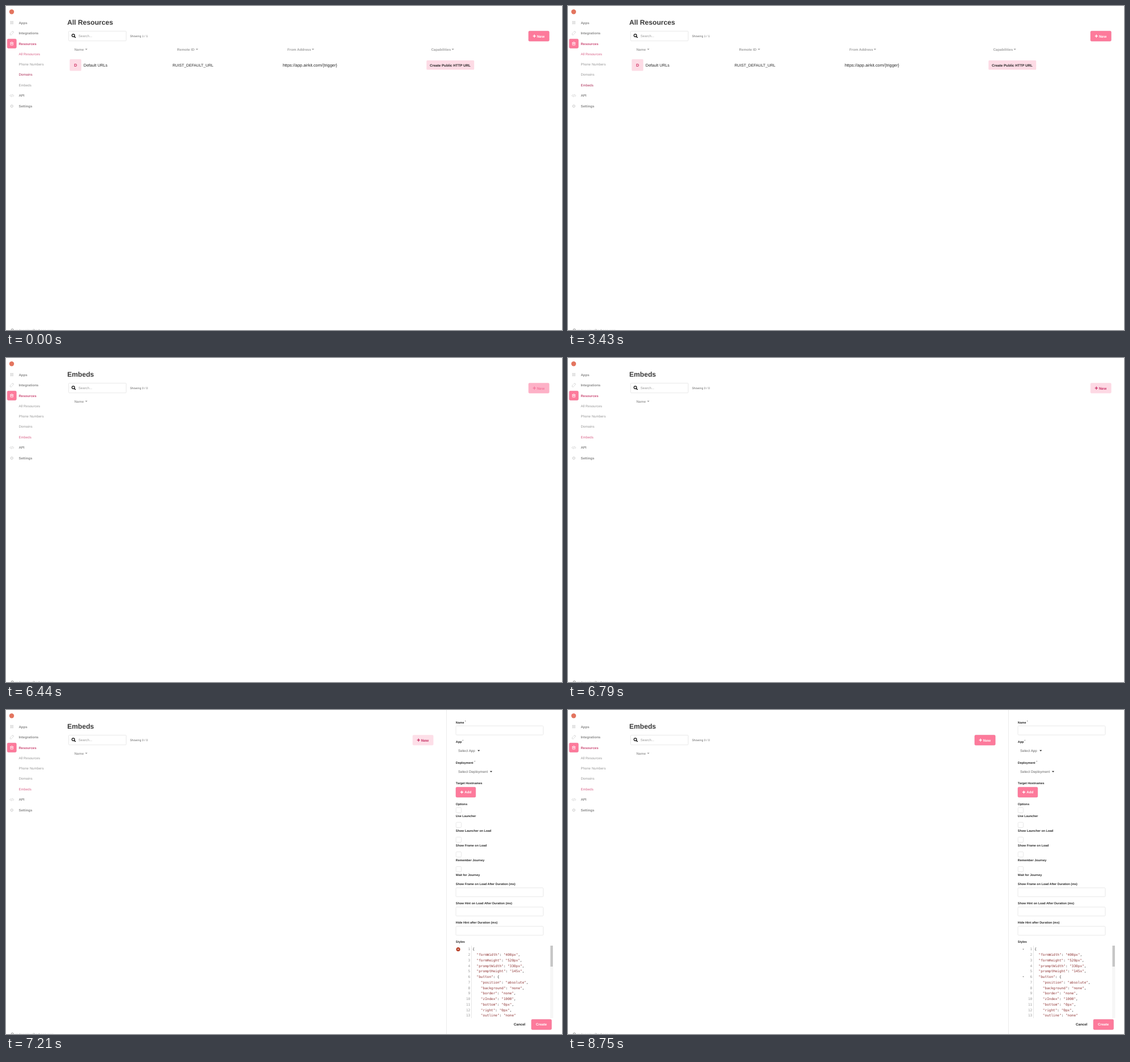
Recreate the animation shown at these times as an HTML page. Size 980 by 572 pixels, loop 9170 ms.

```html
<!DOCTYPE html>
<html lang="en">
<head>
<meta charset="utf-8">
<title>Resources</title>
<style>
  html, body { margin: 0; width: 100%; height: 100%; overflow: hidden; background: #fff; }
  svg { display: block; width: 980px; height: 572px; }
  text { font-family: "Liberation Sans", Arial, sans-serif; text-rendering: geometricPrecision; white-space: pre; }
  .b { font-weight: bold; }
  .code { font-family: "DejaVu Sans Mono", monospace; }
  .line { fill: none; stroke: #c9c9c9; stroke-width: .8; }
</style>
</head>
<body>
<svg id="stage" viewBox="0 0 980 572"></svg>
<script>
const LOOP = 9170;
const PINK = '#fd7a9b', EDGE = '#ec7093', ROSE = '#cc4f79', SOFT = '#d9668b', DARK = '#ad3059', GRAY = '#8b8b8b', INK = '#262626';

// y is the middle of the capital letters
const text = (x, y, size, fill, str, attrs = '') =>
  `<text x="${x}" y="${y + size * .36}" font-size="${size}" fill="${fill}" ${attrs}>${str}</text>`;
const bold = (x, y, size, fill, str, attrs = '') => text(x, y, size, fill, str, 'class="b" ' + attrs);
const rect = (x, y, w, h, fill, r = 0, attrs = '') =>
  `<rect x="${x}" y="${y}" width="${w}" height="${h}" rx="${r}" fill="${fill}" ${attrs}/>`;
const field = (x, y, w, h) => rect(x, y, w, h, '#fff', 1.5, 'stroke="#e2e2e2" stroke-width=".8"');
const caret = (x, y, fill, s = 2.1) => `<path d="M${x - s} ${y - s / 2}h${2 * s}l${-s} ${s * 1.1}z" fill="${fill}"/>`;
const plus = (x, y, color) => `<path d="M${x - 2.6} ${y}h5.2M${x} ${y - 2.6}v5.2" stroke="${color}" stroke-width="1.3"/>`;
const button = (x, y, w, h, fill = PINK, edge = EDGE) =>
  rect(x, y, w, h, fill, 1.8, `stroke="${edge}" stroke-width=".6"`);

function sidebar() {
  const groups = [['Apps', 29.7], ['Integrations', 48], ['Resources', 66.5], ['API', 158.3], ['Settings', 176.8]];
  const pages = ['All Resources', 'Phone Numbers', 'Domains', 'Embeds'];
  return '<circle cx="10" cy="10.3" r="4.2" fill="#e3755f"/>' +
    groups.map(([s, y]) => bold(22.4, y, 6.1, s == 'Resources' ? ROSE : GRAY, s)).join('') +
    pages.map((s, i) => text(22.4, 84.6 + i * 18.35, 6.1, '#999', s, 'data-page')).join('') +
    button(2.2, 58.3, 16, 16.1) +
    `<g class="line">
      <path d="M7.5 27.3h5.6M7.5 29.3h5.6M7.5 31.3h5.6" stroke-width="1.2" stroke-dasharray="1.5 .5"/>
      <path d="M9.7 46.2l1.2-1.1q1.2-.8 2 .1t0 2l-1.8 1.7M10.8 49.6l-1.3 1.2q-1.2.8-2-.1t0-2l1.8-1.7"/>
      <path d="M7.2 65.2l3-1.8 3 1.8zM7.8 66.7h4.8M8 66.7v2.4h4.4v-2.4" stroke="#fff"/>
      <path d="M8.8 156.2l-2 2 2 2M11.8 156.2l2 2-2 2M10.9 155.8l-1.2 4.8"/>
      <circle cx="10.2" cy="176.8" r="1.7"/>
      <circle cx="10.2" cy="176.8" r="2.6" stroke-dasharray="1 1.04"/>
    </g>
    <circle cx="11.2" cy="572.2" r="2.2" class="line" style="stroke:#777"/>` +
    text(16, 572.4, 6.1, GRAY, 'mvlearning@orbano.com');
}

function listing() {
  const head = (x, s, cx) => bold(x, 76.5, 6.2, '#a0a0a0', s) + caret(cx, 76.6, '#999');
  return bold(108, 28.7, 12.1, '#383838', '', 'id="title"') +
    field(110.4, 44.4, 101.5, 17.2) +
    '<path d="M120.3 53.7l2.3 2.3" stroke="#111" stroke-width="1.6"/>' +
    '<circle cx="118.6" cy="52" r="2.4" fill="none" stroke="#111" stroke-width="1.2"/>' +
    text(127.8, 52.6, 6.05, '#999', 'Search...') +
    text(218.4, 53.2, 5.2, '#666', '', 'id="count"') +
    head(120.4, 'Name', 141.5) +
    '<g id="row">' +
    head(301.6, 'Remote ID', 336.6) + head(496, 'From Address', 541) + head(749.4, 'Capabilities', 787.6) +
    rect(112.3, 94, 20.4, 20.4, '#fddbe5', 1.5) +
    bold(122.5, 104.3, 7.2, '#cf2f63', 'D', 'text-anchor="middle"') +
    text(136.8, 104.3, 7.07, INK, 'Default URLs') +
    text(293.4, 104.3, 6.85, INK, 'RUIST_DEFAULT_URL') +
    text(487.7, 104.3, 7.4, INK, 'https://app.airkit.com/{trigger}') +
    rect(741.2, 96, 84, 16.4, '#fddbe5', 1.5) +
    bold(747, 104.3, 6.2, INK, 'Create Public HTTP URL') + '</g>';
}

function editor() {
  const rows = ['{', '  "formWidth": "400px",', '  "formHeight": "520px",', '  "promptWidth": "330px",',
    '  "promptHeight": "145x",', '  "button": {', '    "position": "absolute",', '    "background": "none",',
    '    "border": "none",', '    "zIndex": "1000",', '    "bottom": "0px",', '    "right": "0px",', '    "outline": "none"'];
  const paint = s => s.replace(/"[^"]*"/g, '<tspan fill="#8f3535">$&</tspan>');
  return rows.map((s, i) => {
    const y = 422.3 + i * 9.73;
    return text(818.2, y, 6.05, '#999', i + 1, 'class="code" text-anchor="end"') +
      text(822.3, y, 6.05, INK, paint(s), 'class="code" xml:space="preserve"');
  }).join('') +
    rect(820, 416, .7, 128, '#ddd') + rect(959.3, 416, 5, 128, '#f6f6f6') + rect(959.6, 416, 4.3, 37, '#c6c6c6') +
    `<g id="error"><circle cx="797" cy="422.5" r="3.5" fill="#b5381f"/>
      <path d="M795.7 421.2l2.6 2.6m0-2.6l-2.6 2.6" stroke="#fff" stroke-width=".8"/></g>
    <g id="folds">${caret(802.5, 422.4, '#777', 1.4)}${caret(802.5, 471, '#777', 1.4)}</g>`;
}

function panel() {
  const label = (y, s) => bold(792.8, y, 5.4, INK, s);
  const star = (x, y) => text(x, y, 5, '#444', '*');
  const checks = ['Use Launcher', 'Show Launcher on Load', 'Show Frame on Load', 'Remember Journey', 'Wait for Journey'];
  const times = ['Show Frame on Load After Duration (ms)', 'Show Hint on Load After Duration (ms)', 'Hide Hint after Duration (ms)'];
  return '<g id="panel">' + rect(776, 0, 204, 572, '#fff') + rect(776, 0, .8, 572, '#e6e6e6') +
    label(21.6, 'Name') + star(808.8, 20.6) + field(793, 28, 154, 16) +
    label(55.6, 'App') + star(804.2, 54.6) + text(797, 71.5, 6.22, '#666', 'Select App') + caret(833.2, 71.7, INK) +
    label(92.6, 'Deployment') + star(825.2, 91.6) + text(797, 108.5, 6.22, '#666', 'Select Deployment') + caret(855, 108.7, INK) +
    label(129.5, 'Target Hostnames') + button(793, 136.3, 34.8, 17.7) + plus(803.4, 145, '#fff') + bold(808.3, 145, 6.1, '#fff', 'Add') +
    label(165.8, 'Options') +
    checks.map((s, i) => field(793.2, 172.2 + i * 26.05, 9.3, 9.3) + label(187.3 + i * 26.05, s)).join('') +
    times.map((s, i) => label(307.3 + i * 34.1, s) + field(793, 313.9 + i * 34, 154, 15.8)).join('') +
    label(409.4, 'Styles') + editor() +
    bold(895, 555, 6.2, INK, 'Cancel') + button(926.1, 546.3, 35.4, 17.9) + bold(934, 555, 6.2, '#fff', 'Create') + '</g>';
}

const newButton = `<g id="new">${button(921.1, 44.3, 36.2, 17.8, 'var(--fill)', 'var(--edge)')}` +
  `${plus(931.3, 53.2, 'var(--ink)')}${bold(936, 53.2, 6.4, 'var(--ink)', 'New')}</g>`;

const $ = id => document.getElementById(id);
$('stage').innerHTML = sidebar() + listing() + panel() + newButton;
const pages = document.querySelectorAll('[data-page]');

// [start, fill, ink]
const buttonStates = [
  [0, PINK, '#fff'], [6440, '#fdb1c7', '#f4769b'], [6580, '#fdd3df', '#d94a7a'], [6790, '#fdd9e4', '#c93066'],
  [7210, '#fddfe8', '#c42a5f'], [8680, '#fdb1c7', '#f4769b'], [8750, PINK, '#fff']
];
const show = (id, on) => $(id).style.display = on ? '' : 'none';
const shift = (id, x) => $(id).setAttribute('transform', `translate(${x})`);

function draw(now) {
  const t = now % LOOP;
  const embeds = t >= 4830, hover = t < 3430 ? 2 : 3;
  $('title').textContent = embeds ? 'Embeds' : 'All Resources';
  $('count').textContent = embeds ? 'Showing 0 / 0' : 'Showing 1 / 1';
  show('row', !embeds);
  pages.forEach((el, i) => el.setAttribute('fill',
    i == (embeds ? 3 : 0) ? SOFT : !embeds && i == hover ? DARK : '#999'));

  const open = t >= 7210;
  show('panel', t >= 6930);
  shift('panel', open ? 0 : 129.3);
  shift('new', open ? -204.2 : t >= 6930 ? -36.6 : 0);
  show('error', t < 7280);
  show('folds', t >= 7280);

  const [, fill, ink] = buttonStates.findLast(s => t >= s[0]);
  const colors = { fill, ink, edge: fill == PINK ? EDGE : fill };
  for (const key in colors) $('new').style.setProperty('--' + key, colors[key]);
  requestAnimationFrame(draw);
}
draw(0);
</script>
</body>
</html>
```
